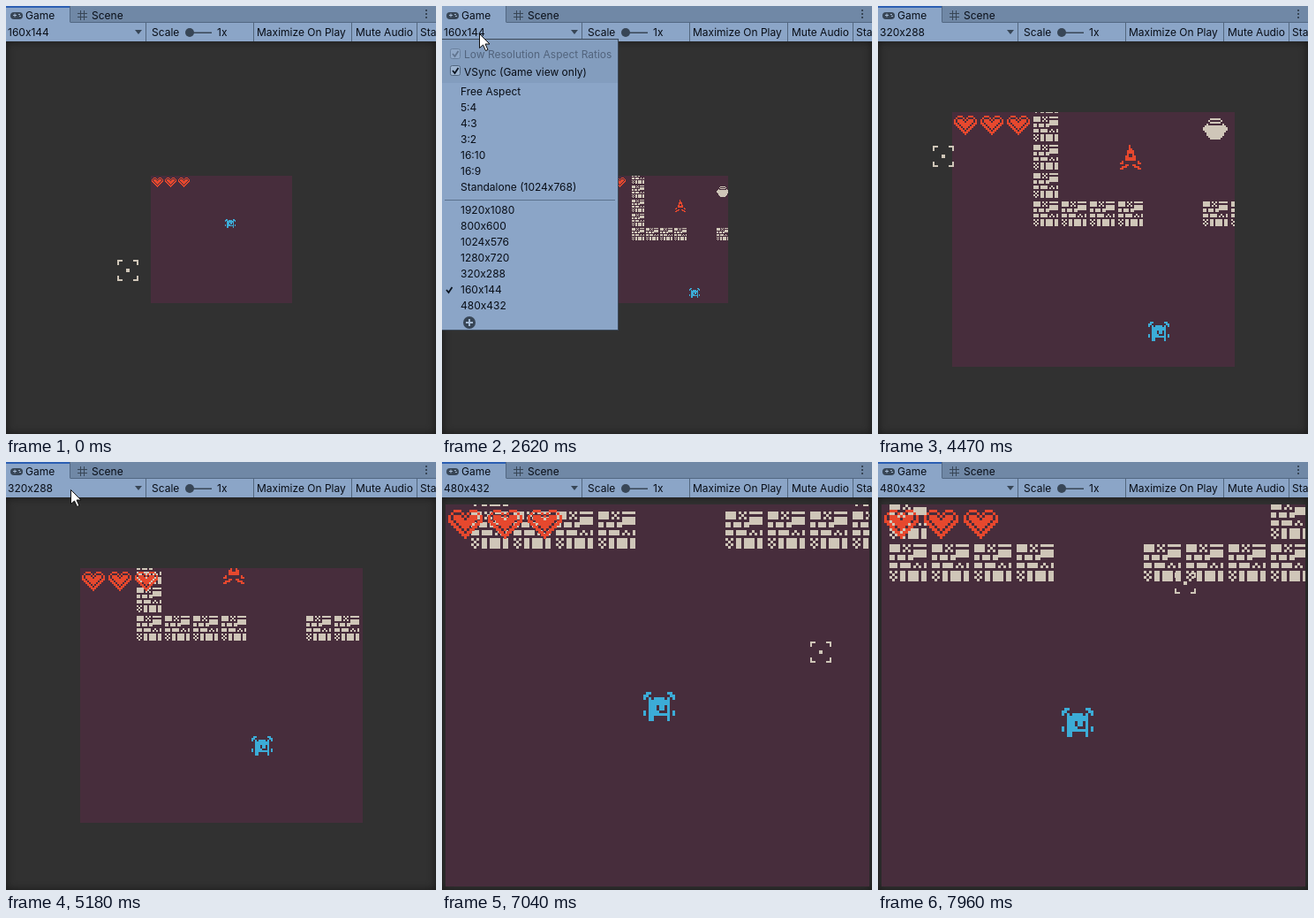
Recreate the animation shown at these times as an HTML page with a canvas. Size 487x484 px, loop 8000 ms.

```html
<!DOCTYPE html>
<html lang="en">
<head>
<meta charset="utf-8">
<title>Game view resolutions</title>
<style>
  html, body { margin: 0; width: 487px; height: 484px; overflow: hidden; background: #313131; }
  canvas, svg { position: absolute; left: 0; top: 0; }
  canvas { top: 40px; background: #313131; box-shadow: inset 0 0 10px #181818; }
  text { font: 12px Inter, "Open Sans", sans-serif; fill: #080d16; }
</style>
</head>
<body>
<canvas width="487" height="444"></canvas>
<svg width="487" height="484">
  <path fill="#7088a6" d="M0 0H487V19H0z"/>
  <path fill="#8ba5c7" d="M0 0H72V19H487V40H0z"/>
  <path fill="#526782" d="M72 0h1v18h-1zM73 18H487v1H73z"/>
  <path id="focus" fill="#2b5fb3" d="M0 0H72V2H0z"/>
  <path fill="#53677f" d="M158 19h1v21h-1zM280 19h1v21h-1zM391 19h1v21h-1zM465 19h1v21h-1z"/>
  <g fill="#384656">
    <rect x="5" y="7" width="14" height="8" rx="4"/>
    <path d="M146 27h8l-4 5z"/>
    <circle cx="208" cy="30" r="5"/>
    <path d="M212 29.500h21v1.500h-21zM475 4h2v2h-2zM475 8h2v2h-2zM475 12h2v2h-2z"/>
    <path d="M84 5h1v11h-1zM88 5h1v11h-1zM81 8h11v1H81zM81 12h11v1H81z"/>
  </g>
  <path fill="#a4b9d3" d="M8 10h4v1H8zM9.500 8.500h1v4h-1zM14 9h2v1h-2zM15 11h2v1h-2z"/>
  <text x="22" y="15">Game</text><text x="97" y="15">Scene</text>
  <text id="size" x="2" y="34"></text>
  <text x="165" y="34">Scale</text><text x="239" y="34">1x</text>
  <text x="284" y="34">Maximize On Play</text><text x="396" y="34">Mute Audio</text><text x="469" y="34">Stats</text>

  <g id="menu">
    <rect x="-1" y="37.500" width="200.500" height="329" fill="#8ba5c7" stroke="#3c4959"/>
    <path fill="#839dbe" d="M0 38H199V87H0z"/>
    <path fill="#5c728e" d="M3 219H196v1H3z"/>
    <rect id="hover" width="199" height="17" fill="#2963e2"/>
    <g fill="#9db4d0" stroke="#52677f">
      <rect x="9.500" y="48.500" width="11" height="11" rx="2" opacity=".5"/>
      <rect x="9.500" y="67.500" width="11" height="11" rx="2"/>
    </g>
    <g fill="none" stroke-width="1.800">
      <path stroke="#61758f" d="M12 54l2.500 3 4-6"/>
      <path stroke="#0b1420" d="M12 73l2.500 3 4-6"/>
      <path id="check" stroke="#0b1420" d="M5 0l2.500 3 4-6"/>
    </g>
    <text x="25" y="59" style="fill:#52647d">Low Resolution Aspect Ratios</text>
    <text x="25" y="79">VSync (Game view only)</text>
    <g id="items"></g>
    <circle cx="31" cy="358" r="7" fill="#384656"/>
    <path stroke="#a4b9d3" stroke-width="2" d="M27 358h8M31 354v8"/>
  </g>

  <g id="mouse">
    <circle id="ring" r="12" fill="#dcdc48" opacity=".75"/>
    <path id="arrow" fill="#fff" stroke="#111" d="M.5.5V16.500l4-3.500 3 6.500 2.500-1-3-6.500h5z"/>
    <path id="cross" fill="none" stroke="#cfc6b8" stroke-width="2" shape-rendering="crispEdges"
      d="M-11-6v-5h5M6-11h5v5M11 6v5h-5M-6 11h-5v-5M-2-1h4M-2 1h4"/>
  </g>
</svg>
<script>
const $ = id => document.getElementById(id);
const ctx = document.querySelector('canvas').getContext('2d');
const LOOP = 8000, BONE = '#cfc6b8', RED = '#e6482e', BLUE = '#3cacd7';

// Builds a sprite; box inside box makes a hole, pair mirrors a box across the width
function shape(width, build) {
  const path = new Path2D();
  const box = (x, y, w = 1, h = 1) => path.rect(x, y, w, h);
  const pair = (x, y, w = 1, h = 1) => { box(x, y, w, h); box(width - x - w, y, w, h); };
  build(box, pair);
  return path;
}

const brick = shape(14, box => {
  // Stones lie side by side with one-pixel joints; a negative width is speckled
  const course = (y, h, ...widths) => {
    let x = 0;
    for (const w of widths) {
      if (w > 0) box(x, y, w, h);
      else for (let i = 0; i < -w; i++)
        for (let j = 0; j < h; j++) if ((i + j + y) % 2 === 0) box(x + i, y + j);
      x += Math.abs(w) + 1;
    }
  };
  course(0, 3, 4, -3);
  course(4, 2, 2, 3, 2);
  course(7, 2, 3, 4, -3, 1);
  course(10, 4, -3, 2, 4, 2);
  box(9, 0, 5, 1);
  box(9, 2, 5, 3);
});

// An outline, a gap one pixel wide and a filled core
const heart = shape(13, box => {
  for (let x = 0; x < 13; x++) {
    const u = Math.abs(x - 6), top = u < 2 ? 2 - u : Math.max(0, u - 4);
    for (let y = top; y <= 10 - u; y++)
      if (Math.min(y - top, 6 - u, 9 - u - y) !== 1) box(x, y);
  }
});

const hero = [1, 0].map(ear => shape(12, (box, pair) => {
  pair(1, ear, 2);
  pair(0, ear + 1, 2);
  pair(0, ear + 2);
  pair(2, 2);
  box(4, 2, 4);
  box(2, 3, 8, 6);
  box(5, 5, 1, 2);
  box(8, 5, 1, 2);
  box(6, 7, 3);
  pair(0, 7, 1, 2);
  box(2, 9, 2, 2);
  box(9, 9, 1, 2);
}));

const fire = shape(12, (box, pair) => {
  box(5, 0, 1, 2);
  for (let y = 2; y < 9; y++) {
    const half = Math.ceil((y + 1) / 3);
    box(6 - half, y, 2 * half);
  }
  box(5, 5, 2, 2);
  pair(1, 9);
  pair(0, 10, 2);
  pair(3, 11, 2);
  pair(1, 12, 3);
  pair(0, 13, 2);
});

const pot = shape(14, (box, pair) => {
  box(4, 0, 6);
  pair(3, 1);
  box(4, 2, 6);
  pair(2, 3);
  pair(1, 4, 1, 4);
  pair(0, 5, 1, 2);
  box(2, 4, 10, 6);
  box(3, 10, 8);
  box(4, 11, 6);
});

// Keys: time, x, y
const mousePath = [
  [0, 138, 299], [470, 130, 9], [1260, 150, 56], [2150, 24, 33], [2450, 42, 31],
  [3030, 42, 31], [3680, 74, 303], [4150, 74, 303], [4800, 73, 31], [5450, 73, 31],
  [6250, 63, 333], [6520, 63, 333], [7040, 429, 215], [7550, 395, 30], [7960, 348, 137]
];
// Corner of the wall inside the game picture
const wallPath = [
  [0, 19, -20], [520, 25, 63], [1260, 29, 56], [2500, 51, 59], [4200, 51, 59],
  [5000, 32, 27], [5180, 32, 27], [5700, 30.5, 30], [6560, 30.5, 30],
  [7040, 9.7, 2.7], [7750, 2, 18], [7960, 3, 15]
];
// Hero seen from that corner
const stepPath = [[7400, 65, 68], [7800, 65, 61.7]];

function follow(keys, t) {
  let i = keys.findIndex(k => k[0] > t);
  if (i < 0) i = keys.length;
  const a = keys[Math.max(0, i - 1)], b = keys[Math.min(i, keys.length - 1)];
  const u = b === a ? 0 : (t - a[0]) / (b[0] - a[0]);
  const e = u * u * (3 - 2 * u);
  return [a[1] + (b[1] - a[1]) * e, a[2] + (b[2] - a[2]) * e];
}

function drawGame(t, scale) {
  const left = 244 - 80 * scale, top = 224 - 72 * scale;
  const sprite = (path, x, y, color) => {
    ctx.setTransform(scale, 0, 0, scale, Math.round(left + x * scale), Math.round(top + y * scale));
    ctx.fillStyle = color;
    ctx.fill(path, 'evenodd');
  };
  ctx.clearRect(0, 0, 487, 444);
  ctx.save();
  ctx.beginPath();
  ctx.rect(left, top, 160 * scale, 144 * scale);
  ctx.clip();
  ctx.fillStyle = '#472d3c';
  ctx.fillRect(0, 0, 487, 444);
  const [wx, wy] = follow(wallPath, t);
  for (let i = 0; i < 10; i++) {
    if (i === 4 || i === 5) continue; // doorway
    const rows = i % 9 ? 1 : 6;
    for (let j = 0; j < rows; j++) sprite(brick, wx + 16 * i, wy - 16 * j, BONE);
  }
  sprite(fire, wx + 49, wy - 32, RED);
  sprite(pot, wx + 96, wy - 47, BONE);
  const [hx, hy] = follow(stepPath, t);
  sprite(hero[Math.floor(t / 190) % 2], wx + hx, wy + hy, BLUE);
  for (let i = 0; i < 3; i++) sprite(heart, 1 + 15 * i, 2, RED);
  ctx.restore();
}

const list = (y, ...labels) => labels.map((label, i) => ({ label, y: y + 18 * i }));
const items = [
  ...list(97, 'Free Aspect', '5:4', '4:3', '3:2', '16:10', '16:9', 'Standalone (1024x768)'),
  ...list(231, '1920x1080', '800x600', '1024x576', '1280x720', '320x288', '160x144', '480x432')
];
for (const item of items) {
  item.node = document.createElementNS('http://www.w3.org/2000/svg', 'text');
  item.node.setAttribute('x', 21);
  item.node.setAttribute('y', item.y + 4);
  item.node.textContent = item.label;
  $('items').append(item.node);
}

const show = (id, on) => $(id).style.display = on ? '' : 'none';
const move = (id, x, y) => $(id).setAttribute('transform', `translate(${x} ${y})`);
const within = (t, a, b) => t >= a && t < b;

function draw(t) {
  const scale = t < 4150 ? 1 : t < 6490 ? 2 : 3;
  const label = `${160 * scale}x${144 * scale}`;
  const open = within(t, 2540, 4140) || within(t, 5330, 6480);
  const [mx, my] = follow(mousePath, t).map(Math.round);
  drawGame(t, scale);

  $('size').textContent = label;
  show('menu', open);
  show('focus', !open);
  const hit = items.find(item => Math.abs(item.y - my) < 9);
  show('hover', hit);
  if (hit) move('hover', 0, hit.y - 8);
  for (const item of items) {
    item.node.style.fill = item === hit ? '#b5cbee' : '';
    if (item.label === label) move('check', 0, item.y);
  }

  const arrow = open || my < 40;
  move('mouse', mx, my);
  show('arrow', arrow);
  show('cross', !arrow);
  show('ring', [2470, 4050, 5260, 6380].some(press => within(t, press, press + 100)));
}

const start = performance.now();
function tick() {
  draw((performance.now() - start) % LOOP);
  requestAnimationFrame(tick);
}
tick();
</script>
</body>
</html>
```
